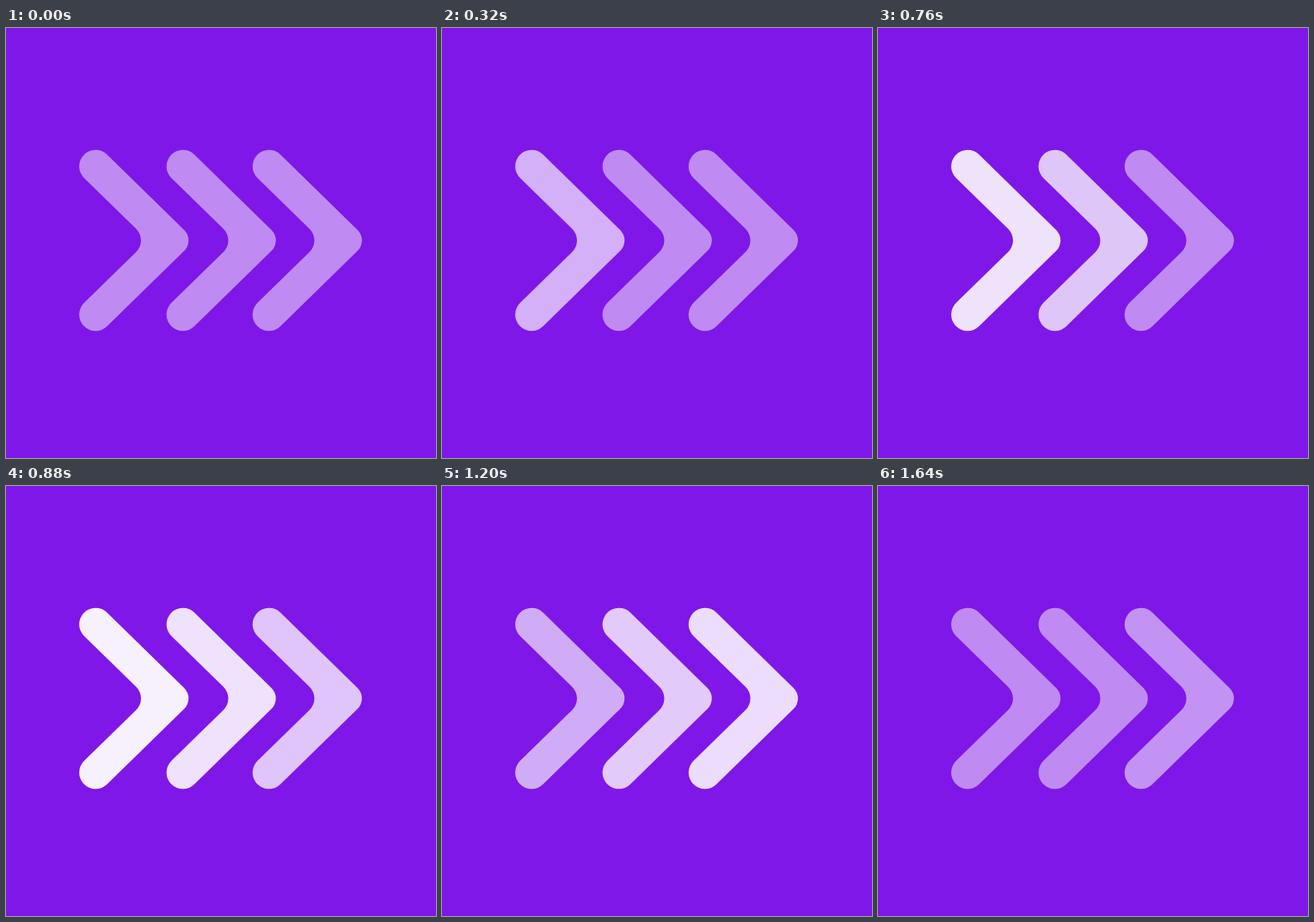
An HTML page with a canvas that plays this animation: 500x500 px, repeating every 1720 ms.

```html
<!DOCTYPE html>
<html lang="en">
<head>
<meta charset="utf-8">
<title>Chevrons</title>
<style>
  html, body { margin: 0; width: 100%; height: 100%; overflow: hidden; background: #7e17e8; }
  canvas { display: block; width: 100%; height: 100%; }
</style>
</head>
<body>
<canvas id="stage" width="500" height="500"></canvas>
<script>
const ctx = document.getElementById('stage').getContext('2d');
const LOOP = 1720;
const PEAK = 1000;
const DIM = 0.5;

// Each chevron brightens from `start` to PEAK, then dims until `end`.
const chevrons = [
  { x: 0, start: 5, end: 1280 },
  { x: 101.5, start: 515, end: 1450 },
  { x: 201.6, start: 760, end: 1685 }
];

// The picture holds between these times: coarse, then every 40 ms, then coarse.
const steps = [0, 160, 320, 480, 600, 680];
for (let t = 760; t <= 1280; t += 40) steps.push(t);
steps.push(1360, 1440, 1520, 1640);

function chevronPath() {
  const x = 104.2, top = 160.8, mid = 247, r = 19.1, slope = 0.774;
  const bottom = 2 * mid - top;
  const corner = x + (mid - top) / Math.tan(slope);
  const offset = r / Math.sin(slope);
  const quarter = Math.PI / 2;
  const path = new Path2D();
  path.arc(x, top, r, slope + quarter, slope + 3 * quarter);
  path.arcTo(corner + offset, mid, x + offset, bottom, 17.3);
  path.arc(x, bottom, r, quarter - slope, 3 * quarter - slope);
  path.arcTo(corner - offset, mid, x - offset, top, 18.8);
  path.closePath();
  return path;
}

const shape = chevronPath();
const clamp = v => Math.min(1, Math.max(0, v));

function opacity({ start, end }, t) {
  const glow = t < PEAK
    ? (t - start) / (PEAK - start)
    : (end - t) / (end - PEAK);
  return DIM + (1 - DIM) * clamp(glow);
}

function draw(time) {
  const now = time % LOOP;
  const t = steps.filter(s => s <= now).pop();
  ctx.fillStyle = '#7e17e8';
  ctx.fillRect(0, 0, 500, 500);
  for (const c of chevrons) {
    ctx.save();
    ctx.translate(c.x, 0);
    ctx.fillStyle = `rgba(255, 255, 255, ${opacity(c, t)})`;
    ctx.fill(shape);
    ctx.restore();
  }
}

const begin = performance.now();
function tick() {
  draw(performance.now() - begin);
  requestAnimationFrame(tick);
}
tick();
</script>
</body>
</html>
```
